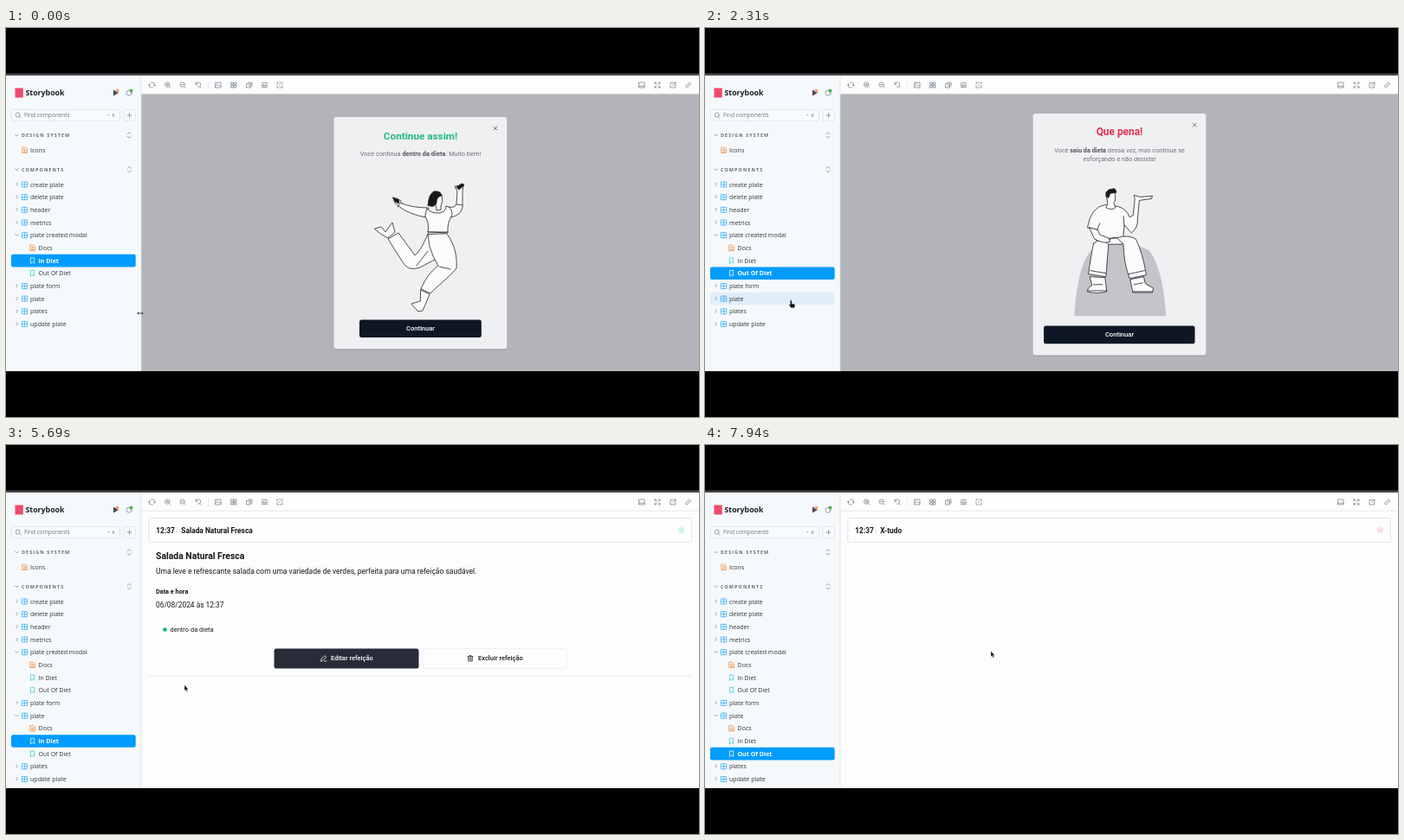
Recreate the animation shown at these times as an HTML page. Size 800 by 450 pixels, loop 8000 ms.

```html
<!DOCTYPE html>
<html lang="en">
<head>
<meta charset="utf-8">
<title>Component browser</title>
<style>
html, body { margin: 0; width: 100%; height: 100%; overflow: hidden; background: #000; }
svg { display: block; width: 100vw; height: 100vh; }
text { font-family: Roboto, sans-serif; white-space: pre; }
.ui { font-family: "Open Sans", sans-serif; }
.icon { fill: none; stroke: #73828c; stroke-width: .75; stroke-linecap: round; stroke-linejoin: round; }
.sketch { fill: #fbfbfc; stroke: #25252a; stroke-width: .8; stroke-linejoin: round; stroke-linecap: round; }
.sketch .ink { fill: #18181b; }
.sketch .line { fill: none; }
</style>
</head>
<body>
<svg id="stage" viewBox="0 0 800 450"></svg>
<script>
const LOOP = 8000, ROW = 14.68, FIRST_ROW = 181;
const stage = document.getElementById('stage');

// Drawing helpers
const rect = (x, y, w, h, fill, more = '') =>
  `<rect x="${x}" y="${y}" width="${w}" height="${h}" fill="${fill}" ${more}/>`;
const frame = (x, y, w, h, stroke = '#e0e1e5', fill = '#fdfdfe', r = 2) =>
  rect(x, y, w, h, fill, `rx="${r}" stroke="${stroke}" stroke-width=".8"`);
const line = (x1, y1, x2, y2, color = '#e3e4e8') =>
  `<path d="M${x1} ${y1}L${x2} ${y2}" stroke="${color}" stroke-width=".8"/>`;
const dot = (x, y, r, fill) => `<circle cx="${x}" cy="${y}" r="${r}" fill="${fill}"/>`;
const text = (x, y, s, size, fill = '#18181b', more = '') =>
  `<text x="${x}" y="${y}" font-size="${size}" fill="${fill}" ${more}>${s}</text>`;
const ui = (x, y, s, size = 7.05, fill = '#2e3438', more = '') =>
  text(x, y, s, size, fill, 'class="ui" ' + more);
const group = (id, body, more = '') => `<g id="${id}" ${more}>${body}</g>`;
const BOLD = 'font-weight="700"', SEMI = 'font-weight="600"', MID = 'text-anchor="middle" ';

const ICONS = {
  sync: 'M-1-3H1A2 2 0 0 1 3-1V1M1 3H-1A2 2 0 0 1-3 1V-1M-4 0L-3-1.3L-2 0M2 0L3 1.3L4 0',
  zoomIn: 'M2.4-.5A2.7 2.7 0 1 1-3-.5A2.7 2.7 0 1 1 2.4-.5M1.7 1.5L3.4 3.2M-1.4-.5H.8M-.3-1.6V.6',
  zoomOut: 'M2.4-.5A2.7 2.7 0 1 1-3-.5A2.7 2.7 0 1 1 2.4-.5M1.7 1.5L3.4 3.2M-1.4-.5H.8',
  reset: 'M-3-3V-.8H-.8M-2.8-1A2.8 2.8 0 1 1-.5 2.3M1.6 1.6L3.3 3.2',
  image: 'M-3-3H3V3H-3ZM-3 1.5L-1-.5L.5 1L1.5 0L3 1.5M-1.5-1.7H-1',
  grid: 'M-3-3H-.6V-.6H-3ZM.6-3H3V-.6H.6ZM-3 .6H-.6V3H-3ZM.6 .6H3V3H.6Z',
  layers: 'M-3-1.5H1.5V3H-3ZM-1.5-3H3V1.5M-1 .8H1.5',
  measure: 'M-3-2.6H3M-3 2.6H3M-3-1V1H3V-1M-1-.8V.8M1-.8V.8',
  outline: 'M-3-1.5V-3H-1.5M1.5-3H3V-1.5M3 1.5V3H1.5M-1.5 3H-3V1.5M-.6 0H.6M-.2-3H.4M-.2 3H.4M-3 0V.3M3 0V.3',
  panel: 'M-3-3H3V3H-3ZM-3 1.2H3',
  expand: 'M-3-1.2V-3H-1.2M1.2-3H3V-1.2M3 1.2V3H1.2M-1.2 3H-3V1.2M-3-3L-1-1M3-3L1-1M3 3L1 1M-3 3L-1 1',
  share: 'M0-2.5H-3V3H2.5V0M1-3H3V-1M3-3L-.5 .5',
  link: 'M-.5-1.5L1-2.8A1.6 1.6 0 0 1 3-.8L1.5 .6M.5 1.5L-1 2.8A1.6 1.6 0 0 1-3 .8L-1.5-.6M-1 1L1-1',
  search: 'M2.2-.5A2.5 2.5 0 1 1-2.8-.5A2.5 2.5 0 1 1 2.2-.5M1.5 1.5L3.2 3.2',
  plus: 'M-2.5 0H2.5M0-2.5V2.5',
  sort: 'M-2-1.4L0-3.2L2-1.4M-2 1.4L0 3.2L2 1.4',
  right: 'M-.8-1.8L1 0L-.8 1.8', down: 'M-1.8-.8L0 1L1.8-.8',
  part: 'M-3-3H3V3H-3ZM-3 0H3M0-3V3',
  story: 'M-2-3.2H2V3.2L0 1.6L-2 3.2Z',
  docs: 'M-2.6-3.2H1.2L2.8-1.6V3.2H-2.6ZM-1.2-.8H1.2M-1.2 .6H1.2M-1.2 2H1.2',
  close: 'M-2-2L2 2M2-2L-2 2',
  pen: 'M-3 3L-2.4 .6L1.4-3.2L3.2-1.4L-.6 2.4ZM.8 3.2H3.4',
  trash: 'M-3-2H3M-2.3-2V3.2H2.3V-2M-1-2V-3.2H1V-2M-.7-.3V1.7M.7-.3V1.7',
  eye: 'M-3 0Q0-3.4 3 0Q0 3.4-3 0ZM-.5 0H.5',
  undo: 'M-1.4-2.6L-3-1.2L-1.4 .2M-3-1.2H1A1.7 1.7 0 0 1 1 2.2H-1'
};
const icon = (name, x, y, color = '#73828c') =>
  `<path class="icon" d="${ICONS[name]}" transform="translate(${x} ${y})" style="stroke:${color}"/>`;
const iconRow = (y, ...items) => items.map(([name, x]) => icon(name, x, y)).join('');

// Sidebar tree
const modalPath = 'plate-created-modal', children = path => [
  ['Docs', 'docs', `/docs/components-${path}--docs`],
  ['In Diet', 'story', `/story/components-${path}--in-diet`],
  ['Out Of Diet', 'story', `/story/components-${path}--out-of-diet`]
];
const part = name => [name, 'part', ''];
const fullTree = [
  ...['create plate', 'delete plate', 'header', 'metrics', 'plate created modal'].map(part),
  ...children(modalPath), part('plate form'), part('plate'), ...children('plate'),
  part('plates'), part('update plate')
];
const shortTree = fullTree.filter((_, i) => i < 10 || i > 12);

function treeMarkup(tree, selected, hovered) {
  return tree.map(([name, kind], i) => {
    const y = FIRST_ROW + i * ROW, on = i === selected, top = kind === 'part';
    const open = name === 'plate created modal' || (name === 'plate' && tree === fullTree);
    const color = on ? '#fff' : top ? '#35aef2' : kind === 'docs' ? '#f08a3c' : '#35cdd6';
    const back = on ? '#029cfd' : i === hovered ? '#e1eef9' : '';
    return (back ? rect(6, y - 7.3, 143.7, 14.6, back, 'rx="2"') : '') +
      (top ? icon(open ? 'down' : 'right', 12.5, y - .3) : '') +
      icon(kind, top ? 21.7 : 30.7, y, color) +
      ui(top ? 28 : 37.5, y + 2.5, name, 7.05, on ? '#fff' : '#2e3438', on ? BOLD : '');
  }).join('');
}

const section = (y, name) => icon('down', 12.5, y) + icon('sort', 142.3, y) +
  ui(18, y + 2, name, 5.4, '#5c6870', BOLD + ' letter-spacing="1.1"');
const sidebar = rect(0, 55, 156, 342, '#f6f9fc') +
  rect(10.5, 69.5, 9.3, 11, '#ee4a6d') + ui(22.5, 78.3, 'Storybook', 8.8, '#1c2024', BOLD) +
  '<path d="M124 71.5L130 75L124 78.5Z" fill="#444b52"/>' + dot(128.5, 72.5, 2, '#f2a27c') +
  `<circle cx="142" cy="75.2" r="3" class="icon"/>` + dot(144.5, 72.5, 2, '#4fb54a') +
  frame(6.3, 94.5, 125, 13.2, '#d5e3ee', '#f8fbfd') + icon('search', 14, 101) +
  ui(21, 103.3, 'Find components', 6.5, '#68757e') + ui(116, 104, '⌃', 5.5, '#68757e') +
  ui(122.5, 103, 'K', 5.5, '#68757e') + frame(136, 94.5, 13.3, 13.2, '#d5e3ee', '#f8fbfd') +
  icon('plus', 142.5, 101) + section(124, 'DESIGN SYSTEM') + section(163.7, 'COMPONENTS') +
  icon('docs', 21.7, 141.3, '#f08a3c') + ui(28, 143.8, 'Icons') + group('tree', '') +
  rect(151.3, 55.5, 3.6, 325.5, '#a8abb0', 'id="sideScroll" rx="1.8"') + line(156, 55, 156, 397, '#dddfe3');

// Toolbars
const storyBar = iconRow(66, ['sync', 168.5], ['zoomIn', 186.5], ['zoomOut', 204], ['reset', 222],
  ['image', 245], ['grid', 263], ['layers', 281], ['measure', 298.5], ['outline', 316],
  ['panel', 734], ['expand', 752], ['share', 770], ['link', 787.5]) + line(233.5, 61.5, 233.5, 70.5);
const docsBar = iconRow(66, ['image', 168.5], ['grid', 186.5], ['outline', 204], ['expand', 787.5]);

// Story content
const cardText = (x, y, name, dotX, tint) => text(x, y, '12:37', 8.4, '#18181b', SEMI) +
  line(x + 23.7, y - 7, x + 23.7, y, '#d9dade') + text(x + 29, y, name, 8.4, '#18181b', SEMI) +
  dot(dotX, y - 3.3, 3.6, tint);
const card = (id, name, tint) => frame(164.8, 84.6, 626.7, 27.8, '#dcdde1').replace('<rect', `<rect id="${id}Box"`) +
  cardText(173.3, 102, name, 779.5, tint);
const details = text(173, 131.5, 'Salada Natural Fresca', 10.4, '#18181b', SEMI) +
  text(173, 149, 'Uma leve e refrescante salada com uma variedade de verdes, perfeita para uma refeição saudável.', 8.5) +
  text(173, 172, 'Data e hora', 7.3, '#18181b', SEMI) + text(173, 188.4, '06/08/2024 às 12:37', 8.4) +
  dot(183.4, 213.6, 2.3, '#21b07d') + text(189.5, 216, 'dentro da dieta', 7.5) +
  rect(309.5, 235.5, 167, 23, '#0f1420', 'id="edit" rx="2.5"') + icon('pen', 366.5, 246.8, '#fff') +
  text(375, 249.3, 'Editar refeição', 7.5, '#fff', 'font-weight="500"') +
  frame(480.8, 235.5, 166.5, 23, '#eeeef1', '#fdfdfe', 2.5) + icon('trash', 536, 246.8, '#18181b') +
  text(545, 249.3, 'Excluir refeição', 7.5, '#18181b', 'font-weight="500"') + line(165, 267, 791.5, 267, '#e6e6ea');

// Docs page
const th = (x, s) => ui(x, 266.5, s, 6.7, '#3f464c', BOLD);
const field = (x, y, s) => ui(x, y, s, 6.7, '#1e9be9');
const value = (x, y, s) => ui(x, y, s, 6.75, '#34383c');
const docs = ui(218, 125, 'plate', 15.8, '#2e3438', BOLD) + frame(218, 142, 521, 91, '#e3e5e9') +
  line(218, 163, 739, 163) + iconRow(152.7, ['zoomIn', 229], ['zoomOut', 246], ['reset', 262.5]) +
  frame(234, 183.5, 489, 27.6) + cardText(242.5, 200.7, 'Salada Natural Fresca', 711, '#cdf5e5') +
  frame(695.5, 220, 43.5, 13, '#e8e9ed', '#fdfdfe', 1) + ui(701, 228.6, 'Show code', 6.3, '#2e3438', BOLD) +
  th(229, 'Name') + th(353, 'Description') + th(531, 'Default') + th(608, 'Control') + icon('undo', 727.5, 264) +
  frame(218, 274.8, 521, 140, '#e6e8ec') + ui(229, 288, 'plate', 7, '#2e3438', BOLD) +
  ui(246, 287, '*', 6, '#e85c4a') + frame(353, 279.5, 28, 10.5, '#e3e6ea', '#f7f8fa') +
  text(356, 287, 'IPlate', 6.2, '#3b4146', 'style="font-family:\'Noto Sans Mono\',monospace"') +
  value(531, 287.5, '-') + field(611, 288, '-') + field(616, 288, 'plate :') + value(636, 288, '{') +
  frame(698, 280, 32, 12.5, '#f2f3f5') + icon('eye', 705, 286.5, '#2e3438') + ui(713.5, 288.4, 'RAW', 4.8, '#2e3438', BOLD) +
  field(624, 300, 'id :') + value(627, 311.5, '"dd17f272-') + value(627, 321.8, 'cbc2-47ca-8dec-611ceb4b1fcd"') +
  field(624, 345, 'name :') + value(648.5, 345, '"Salada Natural Fresca"') + field(624, 367, 'description :') +
  value(627, 379, '"Uma leve e refrescante salada') + value(627, 389.5, 'com uma variedade de verdes,') +
  value(627, 400, 'perfeita para uma refeição') + rect(797.8, 77, 2.2, 134, '#8f9296', 'rx="1"');

// Modals
const sheet = (x, y, w, h) => rect(x, y + 1.5, w, h, '#000', 'rx="3.5" opacity=".1"') + rect(x, y, w, h, '#eff0f2', 'rx="3"');
const title = (y, s, color) => text(478.5, y, s, 11.75, color, MID + BOLD);
const note = (y, s, size = 7.4) => text(478.5, y, s, size, '#71717a', MID);
const strong = s => `<tspan font-weight="700" fill="#55555d">${s}</tspan>`;
const goOn = (x, y, w) => rect(x, y, w, 20.6, '#0f1724', 'rx="2.5"') +
  text(478.5, y + 12.8, 'Continuar', 7.5, '#fff', MID + 'font-weight="500"');
const shape = (d, kind = '') => `<path class="${kind}" d="${d}"/>`;

const dancer = '<g class="sketch">' +
  shape('M487 238C482 250 478 258 472 263L453 237L441 244L458 271Q464 282 478 277L506 262Z') +
  shape('M509 238C518 250 521 264 520 278C510 290 498 298 490 307L479 302C484 290 490 282 499 275Q493 266 489 253L487 239Z') +
  shape('M426 232L433 230L438 236L446 225L449 236L441 243Q434 240 426 233Z') +
  shape('M479 303L489 308L484 320L481 327L476 328Q470 322 468 319L478 316Z') +
  shape('M447 197L450 199L455 199L457 203Q470 208 488 208L485 219Q466 216 453 206Q447 202 447 197Z') +
  shape('M511 207Q519 209 520 203L521 189L518 183L525 182L528 180L527 190L527 207Q526 216 514 219Z') +
  shape('M486 209Q491 215 500 214Q508 213 508 206Q515 207 515 216Q509 226 510 237L487 236Q489 226 484 218Z') +
  shape('M487 236H510M452 207L456 202M520 204L527 205M474 275L487 258M500 276L513 279', 'line') +
  shape('M496 203L497 211L502 210L502 206Q505 200 503 193L494 193Z') +
  shape('M487 205Q488 192 494 189Q502 188 503 194Q497 195 497 202Q494 209 487 205Z', 'ink') +
  shape('M447 196L453 198L454 203L449 201ZM520 184L526 180L529 182L523 187Z', 'ink') + '</g>';

const sitter = '<path d="M427 332Q431 269 449 254Q481 241 512 257Q528 277 531.5 332Z" fill="#c5c3c9"/><g class="sketch">' +
  shape('M462 205Q446 207 442 231L453 234L457 250H482L484 228L492 237Q500 231 499 222L501 200L515 198L516 195L502 196L495 194L496 198L494 217L490 219Q486 209 477 207Z') +
  shape('M452 245L463 248Q468 242 476 243L483 250Q483 270 490 289L509 285Q505 260 497 244Q488 239 478 242Z') +
  shape('M449 249Q459 241 466 250L463 287L443 284Q446 263 449 249Z') +
  shape('M445 287L462 288L464 304Q453 307 442 304Q442 299 447 297Z') +
  shape('M491 290L506 287L508 295L517 300L516 305L494 305Z') +
  shape('M442 303L464 303M494 304H516M445 280L463 283M489 284L507 280M449 296H459M495 296L505 294M453 234L456 226M484 229L483 218', 'line') +
  shape('M444 231L450 244Q461 250 468 247L466 243L456 239L454 234Z') +
  shape('M463 191L465 204L463 208Q469 212 474 208L472 203Q475 199 473 191Z') +
  shape('M463 195Q463 187 470 187Q474 185 475 191L468 192L466 197Z', 'ink') + '</g>';

const inModal = sheet(378.5, 103, 199.7, 268.2) + icon('close', 565, 116, '#55555d') +
  title(128.5, 'Continue assim!', '#27b586') + note(147.5, `Você continua ${strong('dentro da dieta')}. Muito bem!`) +
  dancer + goOn(408, 337.5, 140.8);
const outModal = sheet(380, 101, 197, 275.5) + icon('close', 564, 114, '#55555d') +
  title(126, 'Que pena!', '#e2334f') + note(145, `Você ${strong('saiu da dieta')} dessa vez, mas continue se`, 7.2) +
  note(155, 'esforçando e não desista!', 7.2) + sitter + goOn(392.3, 343, 172);

const label = (x, y, s) => text(x, y, s, 7.2, '#18181b', 'font-weight="500"');
const input = (x, y, w, h, ...lines) => frame(x, y, w, h, '#dcdde1', '#f3f4f6', 3) +
  lines.map((s, i) => text(x + 7, y + 11.5 + i * 9.5, s, 7.1, '#3f3f46')).join('');
const form = sheet(351, 108, 255, 270) + icon('close', 592, 122, '#55555d') +
  label(364, 138, 'Nome') + input(363, 146.5, 230, 19, 'Salada Natural Fresca') +
  label(364, 186.5, 'Descrição') + input(363, 193.5, 230, 34, 'Uma leve e refrescante salada com uma variedade de verdes,', 'perfeita para uma refeição saudável.') +
  label(364, 250, 'Data') + label(484, 250, 'Hora') + input(363, 256, 112, 19, '06/08/2024') + input(483, 256, 110, 19, '12:37 AM') +
  label(364, 297, 'Está dentro da dieta?') + frame(363.5, 305.5, 113, 22.5, '#21b07d', '#dff3ec', 2.5) +
  dot(412, 317, 2, '#21b07d') + label(419, 319.5, 'Sim') + frame(481, 305.5, 112, 22.5, '#e6e7ea', '#eceef0', 2.5) +
  dot(528, 317, 2, '#e2334f') + label(535, 319.5, 'Não') + rect(363, 341, 230, 21.3, '#878a91', 'rx="2.5"') +
  text(478, 354, 'Cadastrar refeição', 7.5, '#fff', MID + 'font-weight="500"');

const cursors = group('hand', '<path d="M-1 1Q0-1 1 1V4L4 4.6Q5 5 4.6 7L4 9H0L-2.5 5.5Q-2.2 4.4-1 5.3Z" fill="#111" stroke="#fff" stroke-width=".4"/>') +
  group('arrow', '<path d="M0 0V6.8L1.5 5.5L2.6 8L3.8 7.5L2.7 5.1H4.6Z" fill="#111" stroke="#fff" stroke-width=".4"/>') +
  group('resize', '<path d="M-3.8 0L-1.8-1.8V-.5H1.8V-1.8L3.8 0L1.8 1.8V.5H-1.8V1.8Z" fill="#111" stroke="#fff" stroke-width=".3"/>');

stage.innerHTML = '<defs><clipPath id="fold"><rect id="foldBox" x="157" y="113" width="643" height="0"/></clipPath></defs>' +
  rect(0, 0, 800, 450, '#000') + rect(0, 52.5, 800, 2.5, '#48494c') + rect(156, 55, 644, 342, '#fdfdfe') +
  group('docsPage', docs) + group('salad', card('salad', 'Salada Natural Fresca', '#cdf5e5')) +
  group('details', details, 'clip-path="url(#fold)"') + group('burger', card('burger', 'X-tudo', '#fddfe2')) +
  rect(156, 76, 644, 321, '#b3b4b9', 'id="shade"') + group('inModal', inModal) + group('outModal', outModal) + group('form', form) +
  rect(156, 55, 644, 21, '#fdfdfe') + line(156, 76.2, 800, 76.2) + group('storyBar', storyBar) + group('docsBar', docsBar) +
  sidebar + group('status', rect(0, 388.3, 181, 9, '#e6e9ed', 'id="statusBox"') +
    text(2, 395.4, '', 6.9, '#33373b', 'id="statusText" style="font-family:\'Noto Sans\',sans-serif"')) +
  rect(0, 397, 800, 53, '#000') + group('cursor', cursors);

const el = {};
stage.querySelectorAll('[id]').forEach(node => el[node.id] = node);

// Timeline: cursor stops as [time, x, y]
const path = [[0, 155, 330], [80, 155, 330], [500, 105, 302], [750, 81, 284], [1100, 81, 284], [1630, 100, 313.5],
  [2250, 100, 313.5], [2600, 91, 330], [2900, 88, 340], [3500, 88, 340], [4400, 297, 99.5], [4800, 297, 99.5],
  [5250, 392, 246], [5480, 392, 246], [5690, 206, 277.5], [6150, 237, 328], [6500, 237, 328],
  [7050, 96, 355], [7400, 86, 355], [7900, 330, 238.3], [8000, 330, 238.3]];
const clamp = v => Math.min(1, Math.max(0, v));
const ramp = (t, from, to) => clamp((t - from) / (to - from));
const smooth = k => k * k * (3 - 2 * k);
const between = (t, a, b) => t >= a && t < b;
const pulse = (t, a, b, c, d) => ramp(t, a, b) * (1 - ramp(t, c, d));

function cursorAt(t) {
  const i = Math.max(1, path.findIndex(p => p[0] > t)), [a, ax, ay] = path[i - 1], [b, bx, by] = path[i];
  const k = smooth(ramp(t, a, b));
  return [ax + (bx - ax) * k, ay + (by - ay) * k];
}
const show = (id, on) => { el[id].style.display = on ? '' : 'none'; };
function popup(id, opacity, restOpacity) {
  show(id, opacity > 0);
  el[id].setAttribute('opacity', opacity);
  const s = 1 + .05 * (opacity - restOpacity);
  el[id].setAttribute('transform', `translate(478.3 237) scale(${s}) translate(-478.3 -237)`);
}

let lastTree = '';
function render(t) {
  const [x, y] = cursorAt(t), open = t >= 2400, tree = open ? fullTree : shortTree;
  const selected = t < 1000 ? 6 : t < 2400 ? 7 : t < 3420 ? 10 : t < 7400 ? 11 : 12;
  const row = Math.round((y + 1 - FIRST_ROW) / ROW);
  const hovered = x > 6 && x < 150 && tree[row] ? row : -1;
  const key = [open, selected, hovered].join();
  if (key !== lastTree) el.tree.innerHTML = treeMarkup(tree, selected, hovered);
  lastTree = key;

  const url = hovered >= 0 && tree[hovered][2];
  show('status', url);
  if (url) {
    const address = 'localhost:6006/?path=' + url;
    if (el.statusText.textContent !== address) el.statusText.textContent = address;
    el.statusBox.setAttribute('width', el.statusText.getComputedTextLength() + 4);
  }
  el.sideScroll.setAttribute('opacity', pulse(t, 2500, 2560, 4550, 4800) + pulse(t, 6900, 6960, 7650, 7850));

  const docsMode = between(t, 2400, 3480);
  show('docsBar', docsMode);
  show('storyBar', !docsMode);
  show('docsPage', between(t, 2560, 3480));
  show('salad', between(t, 3700, 7440));
  show('details', between(t, 4850, 7440));
  show('burger', t >= 7620);
  el.foldBox.setAttribute('height', 156 * smooth(ramp(t, 4850, 5060)));

  const onCard = between(t, 3700, 5500) && x > 165 && y > 85 && y < 112;
  const onEdit = between(t, 5000, 5560) && x > 309 && x < 477 && y > 235 && y < 259;
  el.saladBox.setAttribute('fill', onCard ? '#f4f4f6' : '#fdfdfe');
  el.edit.setAttribute('fill', between(t, 5200, 5750) ? '#272c38' : '#0f1420');

  const first = t < 1160 ? 1 : 0, second = t < 2400 ? ramp(t, 1500, 1680) : 0;
  const third = pulse(t, 5750, 5940, 6240, 6400);
  popup('inModal', first, 1);
  popup('outModal', second, .72);
  popup('form', third, .13);
  el.shade.setAttribute('opacity', Math.max(first, second, third));

  const kind = t < 110 ? 'resize' : hovered >= 0 || onCard || onEdit ? 'hand' : 'arrow';
  ['hand', 'arrow', 'resize'].forEach(id => show(id, id === kind));
  el.cursor.setAttribute('transform', `translate(${x} ${y})`);
}

const start = performance.now();
function tick() {
  render((performance.now() - start) % LOOP);
  requestAnimationFrame(tick);
}
tick();
</script>
</body>
</html>
```
